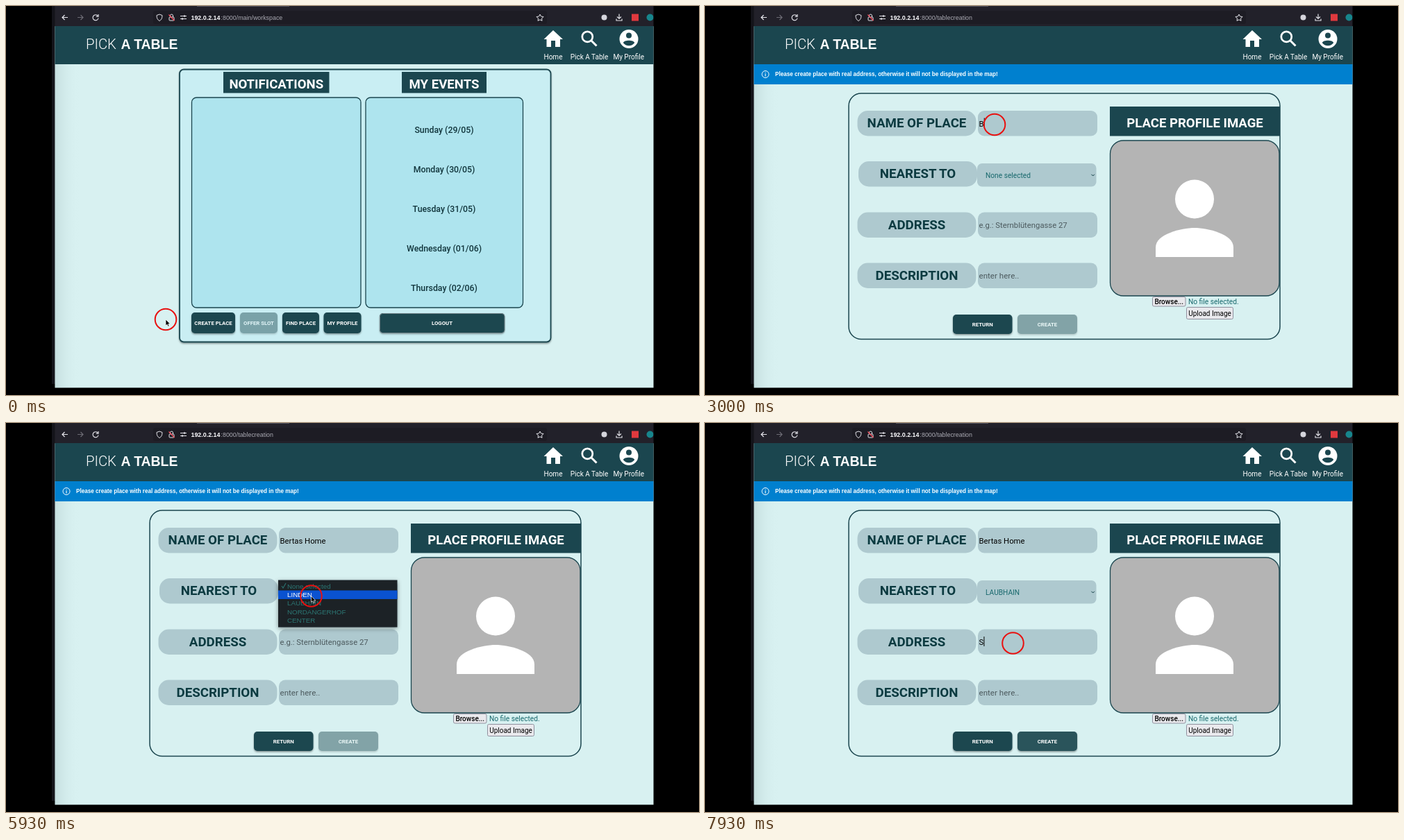
Write an HTML page that moves like this. It is 998 px wide and 561 px high and loops after 8 s.

```html
<!DOCTYPE html>
<html lang="en">
<head>
<meta charset="utf-8">
<title>Create a place</title>
<style>
html, body { margin: 0; width: 100%; height: 100%; overflow: hidden; background: #000; }
svg { display: block; font-family: Roboto, "Noto Sans", sans-serif; }
.arial { font-family: "Liberation Sans", Arial, sans-serif; }
.b { font-weight: 700; }
.m { font-weight: 500; }
.c { text-anchor: middle; }
</style>
</head>
<body>
<svg id="stage" width="998" height="561" viewBox="0 0 998 561"></svg>
<script>
const TEAL = '#1b464f', INK = '#0b3a40', FIELD = '#aec9cf', LOOP = 8000;
const ROWS = [169, 243, 315.5, 388.5];
const OPTIONS = ['None selected', 'LINDEN', 'LAUBHAIN', 'NORDANGERHOF', 'CENTER'];

const text = (x, y, s, size, fill, cls = '', extra = '') =>
  `<text x="${x}" y="${y}" font-size="${size}" fill="${fill}" class="${cls}" ${extra}>${s}</text>`;
const rect = (x, y, w, h, fill, r = 0, extra = '') =>
  `<rect x="${x}" y="${y}" width="${w}" height="${h}" rx="${r}" fill="${fill}" ${extra}/>`;
const line = (d, stroke, w = 1.2, extra = '') =>
  `<path d="${d}" fill="none" stroke="${stroke}" stroke-width="${w}" ${extra}/>`;
const circle = (x, y, r, fill, extra = '') =>
  `<circle cx="${x}" cy="${y}" r="${r}" fill="${fill}" ${extra}/>`;
const group = (id, body, extra = '') => `<g id="${id}" ${extra}>${body}</g>`;
const button = (id, x, y, w, h, label, extra = '') => group(id,
  rect(x, y, w, h, TEAL, 5, 'filter="url(#soft)"') +
  text(x + w / 2, y + h / 2 + 2.8, label, 7.8, '#fff', 'b c'), extra);
const heading = (x, y, w, h, label, base) =>
  rect(x, y, w, h, TEAL) + text(x + w / 2, base, label, 18.6, '#fff', 'b c');

function browserBar() {
  const icon = '#e4e4ea';
  return rect(70.5, 0, 862, 29.5, '#22212a') + rect(275, 0, 133, 1, '#55545e') +
    rect(212, 7, 567, 19, '#1d1c24', 3) +
    line('M89 16.5H81M84.500 13L81 16.500L84.500 20', icon) +
    line('M103 16.500H111M107.500 13L111 16.500L107.500 20', '#6c6b74') +
    line('M132 14A4 4 0 1 0 133 17.500M133 12V15.200H129.800', icon) +
    line('M221 12L225 13.500C225 18 223.500 20 221 21.500C218.500 20 217 18 217 13.500Z', icon, 1) +
    rect(235, 16, 7, 5, 'none', 1, `stroke="${icon}"`) +
    line('M236.500 16V14A2 2 0 0 1 240.500 14V16', icon, 1) + line('M234.500 12.500L242.500 21', '#ff4f5e') +
    line('M251 14.500H256M258 14.500H260M251 18.500H253M255 18.500H260', icon) +
    circle(257, 14.5, 1.3, icon) + circle(254, 18.5, 1.3, icon) +
    line('M769 12L770.500 15L774 15.500L771.500 18L772 21.300L769 19.700L766 21.300L766.500 18L764 15.500L767.500 15Z', icon, 1) +
    circle(861.5, 16.5, 4, '#d5d5dc') +
    line('M883 11.500V18M880 15.500L883 18.300L886 15.500M879 18.500V21H887V18.500', icon) +
    rect(901, 11.5, 10, 10, '#e0393e') + circle(927.5, 16.5, 5, '#17858c', 'clip-path="url(#win)"');
}

function header() {
  return rect(70.5, 29, 862, 55, TEAL) +
    text(115, 62, 'PICK', 20.3, '#fff', '', 'font-weight="300"') +
    text(165.5, 62, 'A TABLE', 19.4, '#fff', 'arial b') +
    '<path d="M785 59V50H791V59H798V48H802L788 35L774.500 48H778.500V59Z" fill="#fff"/>' +
    circle(837.3, 44.3, 7.5, 'none', 'stroke="#fff" stroke-width="2.700"') + line('M842.500 49.500L850.500 57.500', '#fff', 3) +
    circle(897, 47.5, 13.5, '#fff') + circle(897, 42.5, 4, TEAL) +
    `<path d="M888.800 53C890 48.500 904 48.500 905.200 53A10 10 0 0 1 888.800 53Z" fill="${TEAL}"/>` +
    text(788, 76.5, 'Home', 10, '#fff', 'c') + text(840, 76.5, 'Pick A Table', 10, '#fff', 'c') +
    text(896.7, 76.5, 'My Profile', 10, '#fff', 'c');
}

function dashboard() {
  const days = ['Sunday (29/05)', 'Monday (30/05)', 'Tuesday (31/05)', 'Wednesday (01/06)', 'Thursday (02/06)'];
  const border = `stroke="${TEAL}" stroke-width="1.300"`;
  return rect(250, 91.5, 534.5, 393, '#c9eef3', 6, `stroke="${TEAL}" stroke-width="1.800" filter="url(#soft)"`) +
    heading(313, 95, 152.5, 30.5, 'NOTIFICATIONS', 118.5) + heading(570, 95, 122, 30.5, 'MY EVENTS', 118.5) +
    rect(267.5, 132, 243.5, 303, '#aee4ee', 7, border) + rect(518, 132, 226.5, 303, '#aee4ee', 7, border) +
    days.map((d, i) => text(631, 182.5 + 57 * i, d, 12.3, '#12363d', 'm c')).join('') +
    button('open', 267, 442, 63, 30, 'CREATE PLACE') +
    button('offer', 337, 442, 54, 30, 'OFFER SLOT', 'opacity=".45"') +
    button('find', 398, 442, 53, 30, 'FIND PLACE') +
    button('profile', 457.5, 442, 54, 30, 'MY PROFILE') +
    button('logout', 538, 443, 180, 28.5, 'LOGOUT') +
    rect(538.5, 443.5, 179.5, 28, 'none', 4, 'stroke="#71848a"');
}

function form() {
  const labels = ['NAME OF PLACE', 'NEAREST TO', 'ADDRESS', 'DESCRIPTION'];
  const field = (y, i) =>
    rect(i == 1 ? 221 : 219.5, y - (i == 1 ? 19 : 18), 171, 36.5, FIELD, 15) +
    text(i == 1 ? 306.5 : 305, y + (i == 1 ? 5.2 : 6.2), labels[i], 18.7, INK, 'b c') +
    (i == 1 ? rect(392, 227, 171.5, 33.5, FIELD, 7) : rect(393, y - 18, 172, 36.5, FIELD, 9));
  return rect(70.5, 84, 862, 29, '#0080cf') +
    circle(87, 98.5, 5, 'none', 'stroke="#fff"') + line('M87 97.500V101.500M87 95.500V96.500', '#fff', 1.1) +
    text(101, 101.3, 'Please create place with real address, otherwise it will not be displayed in the map!', 8.13, '#fff', 'arial b') +
    rect(207, 126, 621, 354.5, 'none', 18, `stroke="${TEAL}" stroke-width="1.500"`) +
    ROWS.map(field).join('') +
    text(404, 247.5, '', 10.2, '#17686c', '', 'id="choice"') + line('M556.500 242.800L558.700 245L560.900 242.800', INK, 1) +
    text(394.5, 173.5, '', 11.3, '#000', '', 'id="name"') +
    text(394.5, 319.5, '', 11.3, '#000', '', 'id="address"') +
    text(394.5, 392.5, 'enter here..', 11.6, '#4c5a5e') +
    rect(0, 0, 1, 14, '#000', 0, 'id="caret"') +
    heading(583, 145, 245, 42.5, 'PLACE PROFILE IMAGE', 175) +
    rect(583.5, 194, 243.5, 224, '#b4b4b4', 19, `stroke="${TEAL}" stroke-width="1.300"`) +
    circle(705, 278.5, 28, '#fff') +
    '<path d="M649 362V348C649 329 686 320 705 320S761 329 761 348V362Z" fill="#fff"/>' +
    rect(644.5, 419.5, 47.5, 13.5, '#e9e9ed', 2, 'stroke="#8f8f9d"') + text(668.3, 430, 'Browse...', 10, '#000', 'm c') +
    text(696, 430, 'No file selected.', 10.2, '#17686c') +
    rect(693.5, 434.5, 67, 17, '#e9e9ed', 2, 'stroke="#8f8f9d"') + text(727, 447, 'Upload Image', 10, '#000', 'c') +
    button('return', 357, 445, 85.5, 28, 'RETURN') + button('create', 450, 445, 86, 28, 'CREATE');
}

const menu = () => rect(392, 226.5, 171.5, 68, '#1a2328', 0, 'filter="url(#deep)"') +
  rect(392, 0, 171.5, 12.5, '#0a52d0', 0, 'id="bar"') +
  line('M397 235L399 238L403 231', '#2c7673', 1.1) +
  OPTIONS.map((o, i) => text(405, 238.5 + 12.45 * i, o, 9.8, '', 'arial option')).join('');

document.getElementById('stage').innerHTML = `<defs>
  <clipPath id="win"><rect x="70.500" width="862" height="551"/></clipPath>
  <linearGradient id="edge"><stop stop-color="#9fb8ba" stop-opacity=".32"/><stop offset="1" stop-color="#d8f1f1" stop-opacity="0"/></linearGradient>
  <filter id="soft" x="-10%" y="-20%" width="120%" height="150%"><feDropShadow dx="0" dy="1.500" stdDeviation="1.200" flood-opacity=".4"/></filter>
  <filter id="deep" x="-10%" y="-20%" width="120%" height="150%"><feDropShadow dx="0" dy="2" stdDeviation="3" flood-opacity=".4"/></filter>
</defs>` +
  rect(66, 0, 5, 545, '#14141a') + rect(70.5, 29, 862, 521.5, '#d8f1f1') +
  rect(70.5, 84, 36, 466.5, 'url(#edge)') + browserBar() +
  text(266.5, 20, '192.0.2.14', 8.9, '#fbfbfe', 'arial b') +
  text(309.5, 20, '', 8.9, '#a9a9b2', 'arial', 'id="path"') +
  header() + group('home', dashboard()) + group('form', form()) + group('menu', menu()) +
  group('pointer', circle(0, 0, 15.3, 'none', 'stroke="#e9100f" stroke-width="2"') +
    '<path id="arrow" d="M0 0V9L2.100 7.200L3.500 10.300L5 9.600L3.700 6.600H6.400Z" fill="#000" stroke="#fff" stroke-width=".7"/>' +
    line('M-1.500 -5Q0 -5 0 -3.500Q0 -5 1.500 -5M0 -4V4M-1.500 5Q0 5 0 3.500Q0 5 1.500 5', '#222', .9, 'id="beam"'));

const el = {};
document.querySelectorAll('[id]').forEach(e => el[e.id] = e);
const options = [...document.querySelectorAll('.option')];

// time, x, y
const PATH = [[0, 230, 452], [330, 301, 456], [1600, 301, 456], [2070, 417, 171], [4870, 417, 171],
  [5400, 439, 251], [5930, 439.5, 249.5], [6130, 436, 273], [6400, 422, 257], [6800, 422, 257],
  [6930, 447, 287], [7000, 443, 308.500], [7130, 443.5, 317.5], [LOOP, 443.5, 317.5]];

// time, typed text; a trailing bar is the caret
const NAME = [[0, ''], [2330, '|'], [2730, ''], [3000, 'B|'], [3200, 'Be|'], [3270, 'Ber|'], [3330, 'Bert|'],
  [3400, 'Berta|'], [3670, 'Bertas|'], [3730, 'Bertas'], [4070, 'Bertas |'], [4130, 'Bertas '],
  [4330, 'Bertas H'], [4400, 'Bertas Ho'], [4530, 'Bertas Hom'], [4730, 'Bertas Home|'], [4930, 'Bertas Home']];
const ADDRESS = [[0, ''], [7330, '|'], [7730, 'S|']];

const show = (e, on) => e.setAttribute('display', on ? 'inline' : 'none');
const at = (steps, t) => steps.findLast(s => s[0] <= t)[1];

function cursor(t) {
  const i = PATH.findIndex(p => p[0] > t), [t0, x0, y0] = PATH[i - 1], [t1, x1, y1] = PATH[i];
  const u = (t - t0) / (t1 - t0), k = u * u * (3 - 2 * u);
  return [x0 + (x1 - x0) * k, y0 + (y1 - y0) * k];
}

function fill(input, value, hint, y) {
  const typed = value.replace('|', '');
  input.textContent = typed.replace(/ $/, '\u00a0') || hint;
  input.setAttribute('fill', typed ? '#000' : '#4c5a5e');
  if (value.endsWith('|')) {
    show(el.caret, true);
    el.caret.setAttribute('x', 394.7 + (typed ? input.getComputedTextLength() : 0));
    el.caret.setAttribute('y', y - 7.5);
  }
}

function draw(t) {
  const onForm = t >= 1330, [x, y] = cursor(t);
  show(el.home, !onForm);
  show(el.form, onForm);
  el.path.textContent = onForm ? ':8000/tablecreation' : ':8000/main/workspace';
  el.open.setAttribute('opacity', t >= 730 && t < 870 ? .88 : 1);

  show(el.caret, false);
  fill(el.name, at(NAME, t), 'enter here..', ROWS[0]);
  fill(el.address, at(ADDRESS, t), 'e.g.: Sternblütengasse 27', ROWS[2]);
  el.choice.textContent = t < 6600 ? OPTIONS[0] : OPTIONS[2];
  el.create.setAttribute('opacity', .45 + .47 * Math.min(1, Math.max(0, (t - 7670) / 260)));

  show(el.menu, t >= 5470 && t < 6730);
  el.menu.setAttribute('opacity', t < 6600 ? 1 : t < 6670 ? .7 : .3);
  const row = Math.floor((y - 229) / 12.45);
  el.bar.setAttribute('y', 229 + 12.45 * row);
  options.forEach((o, i) => o.setAttribute('fill', i == row ? '#fff' : '#2c7673'));

  const typing = t >= 3000 && t < 4930 || t >= 7730;
  const inField = onForm && x > 393 && (y > 151 && y < 187 || y > 297 && y < 334);
  el.pointer.setAttribute('transform', `translate(${x} ${y})`);
  show(el.arrow, !typing && !inField);
  show(el.beam, !typing && inField);
}

const start = performance.now();
function tick() {
  const t = (performance.now() - start) % LOOP;
  draw(Math.round(Math.floor((t + 4) * .015) / .15) * 10 % LOOP);
  requestAnimationFrame(tick);
}
tick();
</script>
</body>
</html>
```
